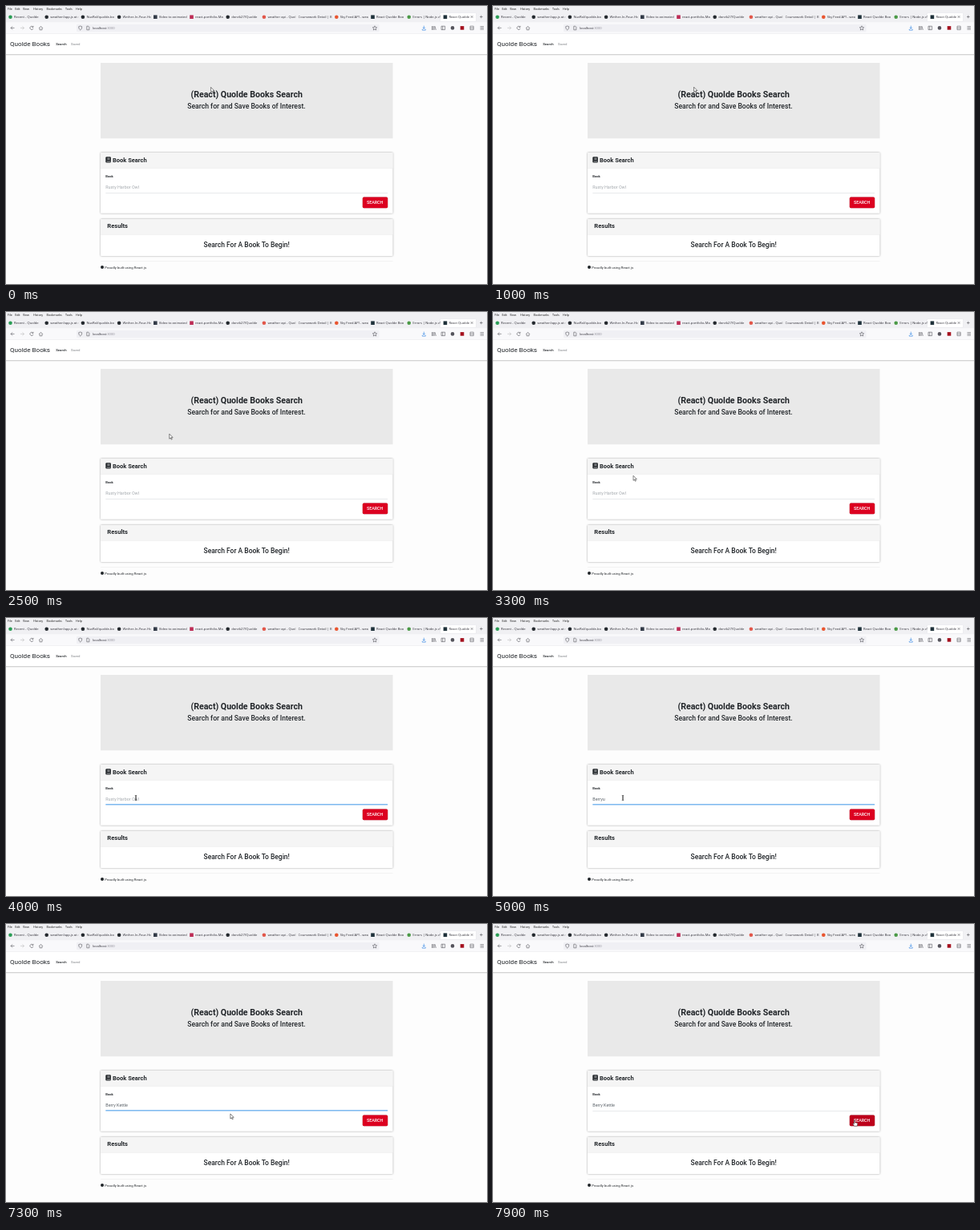
An HTML page for the animation above (8 s loop, 600 by 347 pixels).

```html
<!DOCTYPE html>
<html lang="en">
<head>
<meta charset="utf-8">
<title>Book search</title>
<style>
  html, body { margin: 0; width: 100%; height: 100%; overflow: hidden; background: #fdfdfd; }
  #stage { display: block; width: 100vw; height: 100vh; }
  text { font-family: Roboto, sans-serif; fill: #212529; white-space: pre; }
  .ui text { font-family: "Open Sans", "Noto Sans", sans-serif; font-size: 4.1px; fill: #2b2a33; }
  .ui .menu text { font-size: 3.65px; fill: #111; }
  .line { fill: none; stroke: #55545c; stroke-width: .6; }
  .mid { text-anchor: middle; }
  .med { font-weight: 500; }
  .bold { font-weight: 700; }
  .card { fill: #fff; filter: drop-shadow(0 .6px .8px rgba(0, 0, 0, .38)); }
  .head { fill: #f5f5f5; }
  .pointer { visibility: hidden; }
</style>
</head>
<body>
<svg id="stage" viewBox="0 0 600 347" preserveAspectRatio="none">
  <rect width="600" height="347" fill="#fdfdfd"/>

  <g class="ui">
    <rect width="600" height="20.5" fill="#f0f0f3"/>
    <rect y="20.5" width="600" height="14" fill="#f9f9fb"/>
    <g class="menu" id="menu"></g>
    <rect x="541.5" y="8.5" width="45" height="11" rx="1.2" fill="#fff" stroke="#dcdce2" stroke-width=".4"/>
    <g id="tabs"></g>
    <path class="line" d="M579.8 12.2l2.6 2.6m0-2.6l-2.6 2.6M591 13.5h3.6m-1.8-1.8v3.6"/>

    <rect x="88" y="22.7" width="377.5" height="9.6" rx="1.2" fill="#f0f0f4"/>
    <text x="108" y="29">localhost<tspan fill="#8b8a94">:3000</tspan></text>
    <path class="line" d="M10.5 27.4H6m2-2l-2 2 2 2"/>
    <path class="line" style="stroke:#bbb" d="M18 27.4h4.5m-2-2l2 2-2 2"/>
    <path class="line" d="M33.6 26a2.1 2.1 0 1 0 .4 2M34 24.8v1.7h-1.7M41.2 27.6l2.3-2.4 2.3 2.4M42 27v2.8h3V27"/>
    <path class="line" d="M92.7 25l2 .7c0 2.2-.7 3.5-2 4.3-1.3-.8-2-2.1-2-4.3zM100.8 25.2h2l1 1v3.6h-3z"/>
    <path class="line" d="M460 24.8l.8 1.8 1.9.2-1.4 1.3.4 1.9-1.7-1-1.7 1 .4-1.9-1.4-1.3 1.9-.2z"/>
    <path class="line" style="stroke:#1676e0" d="M521.3 24.7v3.5m-1.5-1.4l1.5 1.5 1.5-1.5m-3.5 2v1.3h4v-1.3"/>
    <path class="line" d="M531.4 25v5m1.4-5v5m1.3-5v5m.9-4.8l1.3 4.8M543 25.2h4.6v4.4H543zm1.8 0v4.4"/>
    <circle cx="557" cy="27.4" r="2.3" fill="#55545c"/>
    <rect x="566.7" y="25.1" width="4.6" height="4.6" fill="#a5121f"/>
    <path class="line" d="M579 25.2h4.2v4.4H579zm0 2.2h4.2M591.5 25.6h4.5m-4.5 1.8h4.5m-4.5 1.8h4.5"/>
    <rect y="34.3" width="600" height=".5" fill="#dedee3"/>
  </g>

  <rect y="34.8" width="600" height="25.4" fill="#fff"/>
  <rect y="60.2" width="600" height=".8" fill="#c9c9c9"/>
  <rect y="61" width="600" height=".9" fill="#efefef"/>
  <text x="5" y="50.4" font-size="8.1">Quolde Books</text>
  <text class="med" x="62.2" y="49" font-size="4.3">Search</text>
  <text x="81" y="49" font-size="4.25" style="fill:#808488">Saved</text>

  <rect x="118" y="71" width="364.5" height="94.3" fill="#e9e9e9"/>
  <text class="mid bold" x="300.2" y="114.2" font-size="10.6">(React) Quolde Books Search</text>
  <text class="mid med" x="300" y="127.8" font-size="8.6">Search for and Save Books of Interest.</text>

  <rect class="card" x="118" y="183" width="364.5" height="75.8" rx="1"/>
  <path class="head" d="M118 202.5v-18.5q0-1 1-1h362.5q1 0 1 1v18.5z"/>
  <rect y="202.4" x="118" width="364.5" height=".4" fill="#e3e3e3"/>
  <rect x="124.3" y="188.2" width="6.6" height="7.2" rx="1.2" fill="#212529"/>
  <path d="M126.3 190h3.2m-3.2 1.3h3.2M125.6 194h4.8" stroke="#f5f5f5" stroke-width=".6"/>
  <text class="bold" x="133" y="194.6" font-size="7.5">Book Search</text>
  <text class="bold" x="124.3" y="214.1" font-size="4.1">Book</text>
  <text id="field" x="124.3" y="227.7" font-size="5.4"></text>
  <rect id="caret" y="222.8" width=".5" height="6" fill="#333"/>
  <rect id="rule" x="124.3" width="351.8"/>
  <rect id="button" x="444.8" y="238.4" width="31.4" height="13.8" rx="1.6"
        style="filter:drop-shadow(0 .5px .6px rgba(0,0,0,.35))"/>
  <text class="mid med" x="460.2" y="247.2" font-size="5.35" style="fill:#fff">SEARCH</text>

  <rect class="card" x="118" y="266" width="364.5" height="46" rx="1"/>
  <path class="head" d="M118 285.3v-18.3q0-1 1-1h362.5q1 0 1 1v18.3z"/>
  <rect y="285.2" x="118" width="364.5" height=".4" fill="#e3e3e3"/>
  <text class="bold" x="126.3" y="277.3" font-size="7.6">Results</text>
  <text class="mid med" x="300.2" y="300.8" font-size="8.5">Search For A Book To Begin!</text>

  <rect x="118" y="318" width="364.5" height=".4" fill="#000" opacity=".1"/>
  <circle cx="120" cy="326" r="2" fill="#212529"/>
  <text x="123.2" y="327.6" font-size="4.33">Proudly built using React js</text>

  <path class="pointer" id="arrow" d="M0 0v6.1l1.4-1.3 1 2.2 1-.5-1-2.1h1.9z" fill="#fff" stroke="#222" stroke-width=".55"/>
  <path class="pointer" id="beam" d="M-1.2-3h.8q.4 0 .4.4v5.2q0 .4-.4.4h-.8M1.2-3H.4Q0-3 0-2.6v5.2q0 .4.4.4h.8" fill="none" stroke="#222" stroke-width=".65"/>
  <path class="pointer" id="hand" d="M-.6.3q.6-.6 1.1 0v2.5l2.5.5q.9.2.8 1l-.5 2.9H-.4l-1.8-2.7q.1-.9.9-.4l.7.6z" fill="#fff" stroke="#222" stroke-width=".5"/>
</svg>

<script>
const $ = id => document.getElementById(id);
const NS = "http://www.w3.org/2000/svg";

function add(parent, tag, attrs, label) {
  const el = document.createElementNS(NS, tag);
  for (const name in attrs) el.setAttribute(name, attrs[name]);
  if (label) el.textContent = label;
  parent.append(el);
  return el;
}

const menu = [["File", 2], ["Edit", 11.2], ["View", 21], ["History", 34], ["Bookmarks", 50.6], ["Tools", 74], ["Help", 87]];
for (const [label, x] of menu) add($("menu"), "text", { x, y: 4.6 }, label);

const INK = "#24292e", TEAL = "#20323b";
const tabs = [
  ["Recent - Quolde", "#2a9d55", "dot"],
  ["weather/app.js at m", INK, "dot"],
  ["NuvRal/quolde-bo", INK, "dot"],
  ["Wether-In-Your-Ho", INK, "dot"],
  ["Video to animated", "#333b48", "box"],
  ["react-portfolio-Ma", "#bd2c55", "box"],
  ["dorvik27/Quolde", INK, "dot"],
  ["weather api - Quol", "#e2574a", "dot"],
  ["Coursework Detail | B"],
  ["Sky Feed API - wea", "#e9552f", "dot"],
  ["React Quolde Boo", TEAL, "box"],
  ["Errors | Node.js v1", "#4b9a47", "dot"],
  ["React Quolde", TEAL, "box"]
];
tabs.forEach(([label, fill, icon], i) => {
  const x = 3 + i * 45.2;
  if (icon === "dot") add($("tabs"), "circle", { cx: x + 2.5, cy: 13.7, r: 2.3, fill });
  if (icon === "box") add($("tabs"), "rect", { x: x + .2, y: 11.4, width: 4.6, height: 4.6, fill });
  const left = icon ? 7 : 0;
  const end = i === 12 ? 35 : 42;
  const clip = add($("tabs"), "svg", { x: x + left, y: 8, width: end - left, height: 11, overflow: "hidden" });
  add(clip, "text", { x: 0, y: 7.2 }, label);
});

const LOOP = 8000, STEP = 100;
const FOCUS = 3700, BLUR = 7800;

// time, x, y of the pointer's hot spot
const path = [
  [0, 255.6, 101.4], [500, 254.6, 101.4], [1000, 250.6, 101.2], [1500, 241, 112],
  [2500, 203.8, 152.2], [3000, 188, 184], [3600, 162, 224.5], [6900, 162, 224.5],
  [7200, 260, 236], [7700, 451, 245], [8000, 451, 245]
];

// time of each key and the text it leaves
const keys = [
  [4100, "B"], [4200, "Be"], [4300, "Berr"], [4400, "Berry"], [4500, "Berryu"],
  [5500, "Berry"], [5700, "Berry "], [5900, "Berry K"], [6000, "Berry Ke"],
  [6200, "Berry Ket"], [6300, "Berry Kett"], [6600, "Berry Kettl"], [6700, "Berry Kettle"]
];

function pointerAt(t) {
  const i = path.findIndex(p => p[0] > t);
  const [t0, x0, y0] = path[i - 1], [t1, x1, y1] = path[i];
  const k = (t - t0) / (t1 - t0), s = k * k * (3 - 2 * k);
  return [x0 + (x1 - x0) * s, y0 + (y1 - y0) * s];
}

const inside = (x, y, l, t, r, b) => x >= l && x <= r && y >= t && y <= b;

function draw(t) {
  const [x, y] = pointerAt(t);
  const overField = inside(x, y, 124, 218, 476, 233);
  const overButton = inside(x, y, 444.8, 238.4, 476.2, 252.2);
  const shape = overField ? "beam" : overButton ? "hand" : "arrow";
  for (const id of ["arrow", "beam", "hand"]) {
    $(id).style.visibility = id === shape ? "visible" : "hidden";
  }
  $(shape).setAttribute("transform", `translate(${x} ${y})`);
  $("button").setAttribute("fill", overButton ? "#bd001b" : "#dc0020");

  const key = keys.filter(k => k[0] <= t).pop();
  const field = $("field");
  field.textContent = key ? key[1] : "Rusty Harbor Owl";
  field.style.fill = key ? "#5b6269" : "#a3a8ad";

  const focused = t >= FOCUS && t < BLUR;
  const rule = $("rule");
  rule.setAttribute("y", focused ? 232.3 : 233);
  rule.setAttribute("height", focused ? 1.1 : .4);
  rule.setAttribute("fill", focused ? "#4b9ee8" : "#c4c8cc");

  const since = t - (key ? key[0] : FOCUS);
  const lit = focused && since % 1000 < (key ? 500 : 300);
  $("caret").style.visibility = lit ? "visible" : "hidden";
  $("caret").setAttribute("x", 124.3 + (key ? field.getComputedTextLength() : 0));
}

const start = performance.now();
function tick() {
  const t = (performance.now() - start) % LOOP;
  draw(Math.floor(t / STEP) * STEP);
  requestAnimationFrame(tick);
}
tick();
</script>
</body>
</html>
```
